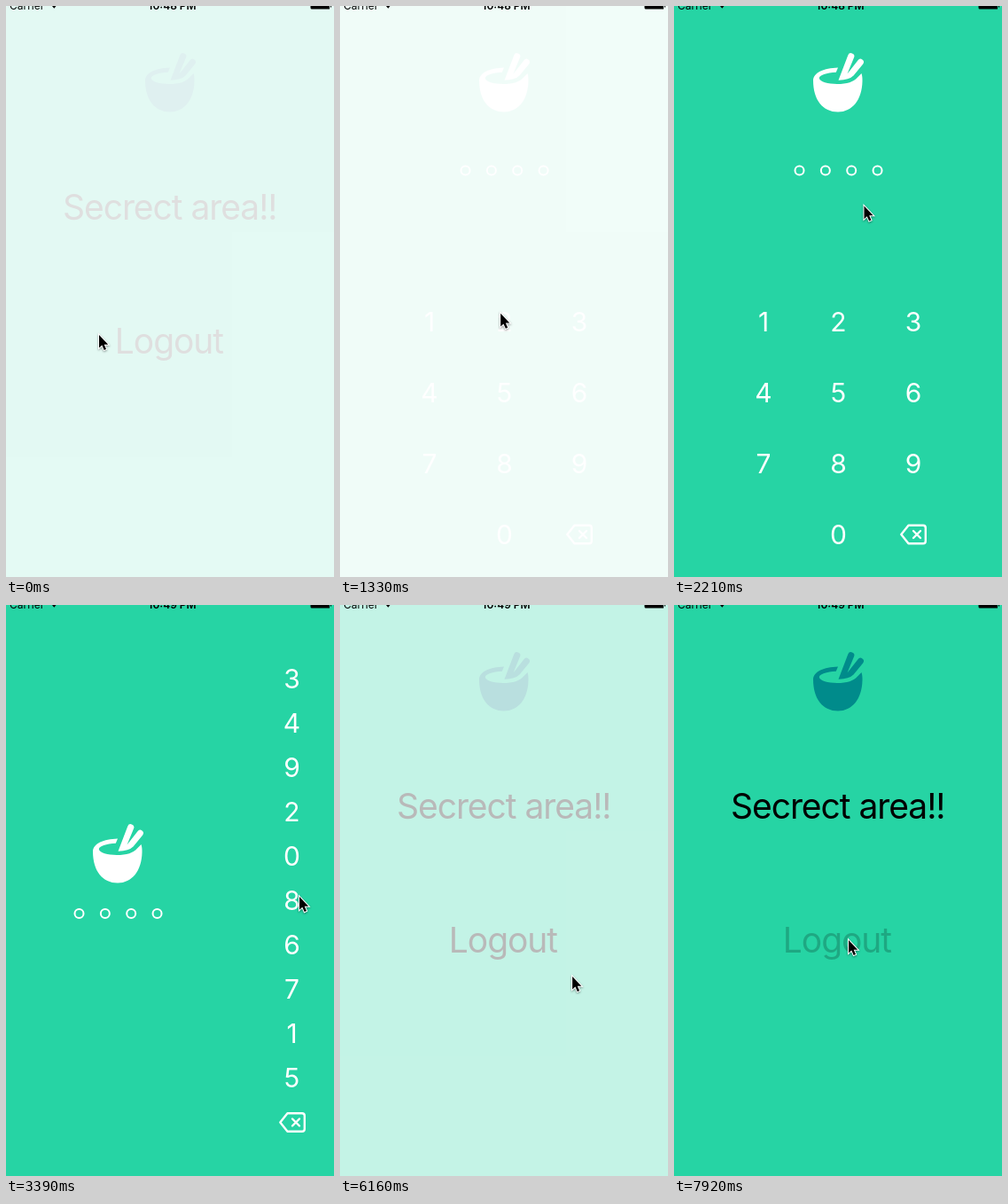
Write an HTML page that moves like this. It is 370 px wide and 644 px high and loops after 8000 ms.

```html
<!DOCTYPE html>
<html lang="en">
<head>
<meta charset="utf-8">
<title>Pin login</title>
<style>
  html, body { margin: 0; width: 370px; height: 644px; overflow: hidden; background: #fff; }
  svg { display: block; font-family: Inter, Roboto, "Liberation Sans", sans-serif; font-optical-sizing: none; }
  .bg { fill: #26d4a4; }
  .title { font-size: 39px; letter-spacing: -1.05px; }
  .key { font-size: 30px; text-anchor: middle; fill: #fff; }
  .line { fill: none; stroke: #fff; stroke-width: 2.4; stroke-linejoin: round; stroke-linecap: round; }
  .bar { font-size: 12px; }
  .clock { font-weight: 600; text-anchor: middle; }
  #pointer { stroke: #fff; stroke-width: 2; paint-order: stroke; filter: drop-shadow(0 1px 1px #0006); }
</style>
</head>
<body>
<svg width="370" height="644" viewBox="0 0 370 644">
  <defs>
    <g id="bowl">
      <path d="M157 84C157.500 75 169 70 185 69.500L182.800 74.800C172 75.500 164 78 163.800 81.300C164 85.500 174 88 184 88C195 88 203 85.500 207 80.500L211.500 76C212.300 78.500 212.600 81 212.500 85C212 106 201 119.500 185 119.500C168 119.500 157 106 157 84Z"/>
      <path d="M185.500 83.700L196.300 55.500A3.600 3.600 0 0 1 203.100 58.100L195.500 76.500L207.500 61.200A3.500 3.500 0 0 1 213.200 65.400L202.500 78.500Q197.500 83.500 185.500 83.700Z"/>
    </g>
    <g id="erase" class="line">
      <path d="M-13.700 0L-5.500 -10.200H11Q13.800 -10.200 13.800 -7.500V7.500Q13.800 10.200 11 10.200H-5.500Z"/>
      <path d="M0 -4L8 4M8 -4L0 4"/>
    </g>
  </defs>

  <g id="secret">
    <rect class="bg" width="370" height="644"/>
    <use href="#bowl" fill="#008b8b"/>
    <text class="title" x="64" y="241">Secrect area!!</text>
    <text class="title" id="logout" x="122.800" y="392">Logout</text>
  </g>

  <g id="login">
    <rect class="bg" width="370" height="644"/>
    <g id="head">
      <use href="#bowl" fill="#fff"/>
    </g>
    <g id="dots"></g>
    <g id="keys"></g>
    <use id="back" href="#erase"/>
  </g>

  <g class="bar">
    <text x="4" y="3.500">Carrier</text>
    <path d="M52 0H56.500L54.300 2.800Z"/>
    <text class="clock" id="clock" x="187.500" y="3.500"></text>
    <path d="M343.500 0H365V3.500H345Q343.500 3.500 343.500 2ZM366 0H367V1.500H366Z"/>
  </g>

  <path id="pointer" d="M0 0V14.600L3.300 11.600L5.700 17L8 16L5.700 10.700H10.200Z"/>
</svg>
<script>
const LOOP = 8000, STEP = 440 / 3, FADE = 766;
const PRESSES = [29, 32, 35, 39];
const SHUFFLED = "3492086715";
// time, x, y of the pointer tip
const PATH = [
  [0, 105, 371], [587, 170, 386], [1180, 172, 384], [1760, 210, 230],
  [2350, 216, 224], [2800, 216, 224], [3373, 331, 329], [3960, 325, 454],
  [4106, 321, 475], [5760, 321, 475], [6453, 219, 378], [7480, 197, 377],
  [7620, 197, 378], [8000, 197, 378]
];

const $ = id => document.getElementById(id);
const add = (parent, tag, attrs) => {
  const el = document.createElementNS("http://www.w3.org/2000/svg", tag);
  for (const name in attrs) el.setAttribute(name, attrs[name]);
  return parent.appendChild(el);
};
const move = (el, x, y) => el.setAttribute("transform", `translate(${x} ${y})`);

const keys = [..."0123456789"].map(digit => {
  const el = add($("keys"), "text", { class: "key" });
  el.textContent = digit;
  return el;
});
const dots = [0, 1, 2, 3].map(i =>
  add($("dots"), "circle", { cx: 141.5 + 29.35 * i, cy: 185.5, r: 5, stroke: "#fff", "stroke-width": 2 }));

function layout(list) {
  keys.forEach((el, d) => {
    const cell = d ? d - 1 : 10;
    if (list) move(el, 322.5, 94 + 50 * SHUFFLED.indexOf(d));
    else move(el, 101 + 84.5 * (cell % 3), 367 + 80 * Math.floor(cell / 3));
  });
  move($("head"), list ? -59 : 0, list ? 194 : 0);
  move($("dots"), list ? -59 : 0, list ? 162.5 : 0);
  move($("back"), list ? 323 : 270, list ? 583.5 : 596);
}

function pointerAt(t) {
  const i = PATH.findIndex(p => p[0] > t);
  const [a, b] = [PATH[i - 1], PATH[i]];
  const k = (t - a[0]) / (b[0] - a[0]);
  return [a[1] + (b[1] - a[1]) * k, a[2] + (b[2] - a[2]) * k];
}

// dimmed while held, half way back one step after release
const touch = (n, down, up) => n >= down && n < up ? 0.2 : n === up ? 0.6 : 1;

let last = -1;
function render(now) {
  const n = Math.floor((now % LOOP + 4) / STEP);
  if (n !== last) {
    last = n;
    const t = n * STEP;
    const fade = start => Math.min(1, Math.max(0, (t - start) / FADE));
    const onLogin = n >= 9 && n < 41;

    $("secret").style.display = onLogin ? "none" : "";
    $("login").style.display = onLogin ? "" : "none";
    $("secret").style.opacity = fade(n < 9 ? -92 : 5952);
    $("login").style.opacity = fade(1272);
    $("logout").style.opacity = Math.min(touch(n, 6, 8), touch(n, 54, 56));

    layout(n >= 17);
    keys[1].style.opacity = Math.min(...PRESSES.map(p => touch(n, p, p + 1)));
    const typed = PRESSES.filter(p => p < n).length;
    dots.forEach((el, i) => el.setAttribute("fill", i < typed ? "#fff" : "none"));

    $("clock").textContent = n < 21 ? "10:48 PM" : "10:49 PM";
    move($("pointer"), ...pointerAt(t));
  }
  requestAnimationFrame(render);
}
render(0);
</script>
</body>
</html>
```
